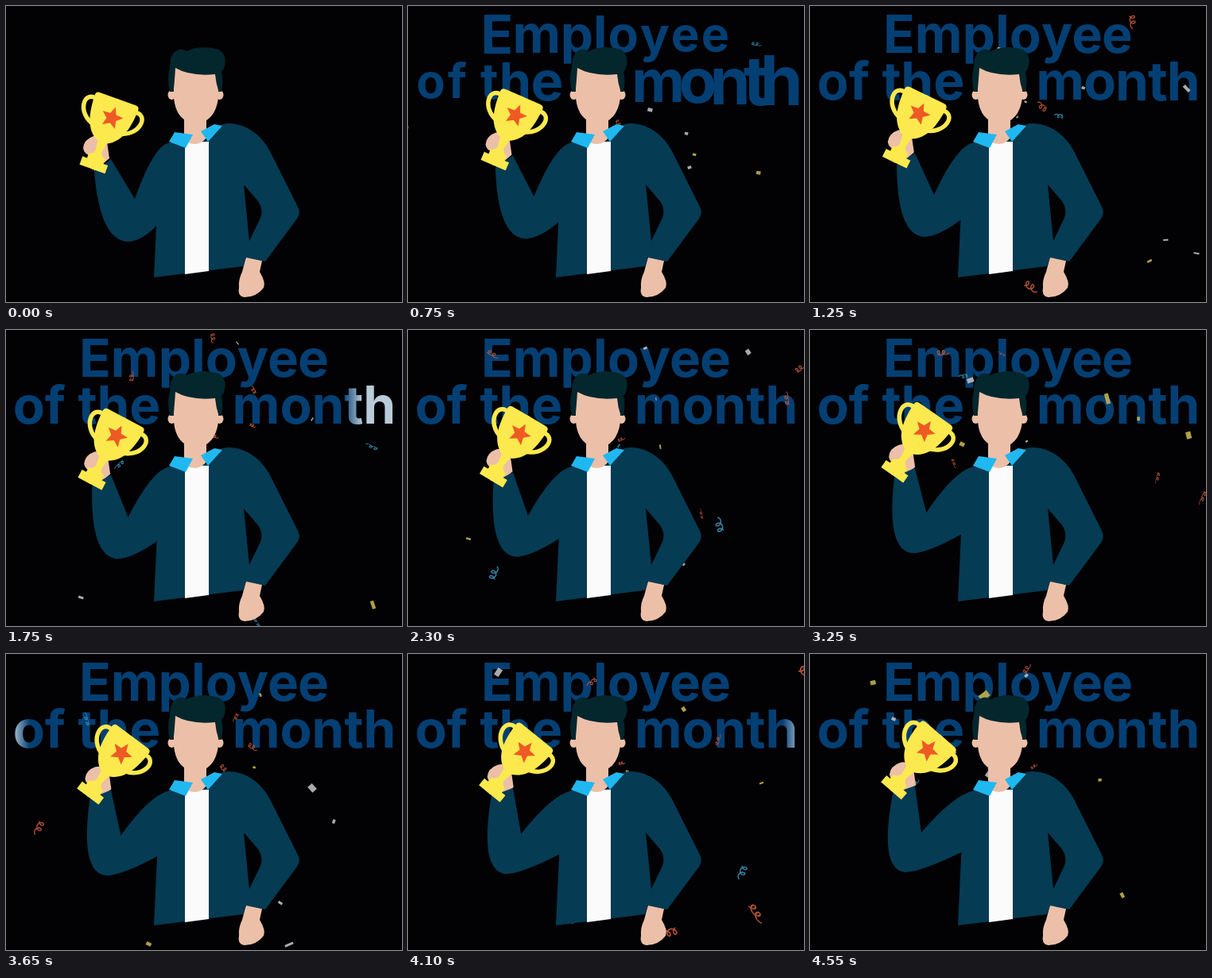
An HTML page with a canvas for the animation above (4600 ms loop, 498 by 373 pixels).

```html
<!DOCTYPE html>
<html lang="en">
<head>
<meta charset="utf-8">
<title>Employee of the month</title>
<style>
html, body { margin: 0; width: 100%; height: 100%; overflow: hidden; background: #020104; }
canvas { display: block; width: 498px; height: 373px; }
</style>
</head>
<body>
<canvas id="stage" width="498" height="373"></canvas>
<script>
const W = 498, H = 373, LOOP = 4600, STEP = 50;
const ctx = document.getElementById('stage').getContext('2d');
const NIGHT = '#020104', NAVY = '#053b53', SKIN = '#ecc0a8', HAIR = '#04262d',
      SKY = '#20b8f0', YELLOW = '#fbe94e', STAR = '#ee5a24', TEXT = '#043f73', GLOSS = '#b9cad8';

const lerp = (a, b, p) => a + (b - a) * p;
const fill = (d, color) => { ctx.fillStyle = color; ctx.fill(new Path2D(d)); };

// Lettering: each letter springs in, then a shine sweeps across
const LINES = [['Employee', 249, 59], ['of the', 101.5, 118], ['month', 387.5, 118]];
const POP = { start: 46, stagger: 28, swing: 260, decay: 216 };
const SHINE = { start: 1340, every: 1155, speed: 1.18 };

const spring = t => 1 - Math.exp(-t / POP.decay) * Math.cos(Math.PI * t / POP.swing);

function textColor(t) {
  if (t < SHINE.start) return TEXT;
  const x = -15 + ((t - SHINE.start) % SHINE.every) * SHINE.speed;
  const g = ctx.createLinearGradient(x - 45, 0, x + 45, 0);
  g.addColorStop(0, TEXT);
  g.addColorStop(0.27, GLOSS);
  g.addColorStop(0.75, GLOSS);
  g.addColorStop(1, TEXT);
  return g;
}

function drawText(t) {
  ctx.font = '700 65.5px Inter, "Open Sans", sans-serif';
  ctx.fillStyle = textColor(t);
  const width = s => ctx.measureText(s).width;
  let n = 0;
  for (const [line, center, base] of LINES) {
    const left = center - width(line) / 2;
    [...line].forEach((ch, i) => {
      if (ch === ' ') return;
      const local = t - POP.start - POP.stagger * n++;
      if (local <= 0) return;
      const x = left + width(line.slice(0, i));
      const cx = x + width(ch) / 2, cy = base - 22, s = spring(local);
      ctx.save();
      ctx.translate(cx, cy);
      ctx.scale(s, s);
      ctx.translate(-cx, -cy);
      ctx.fillText(ch, x, base);
      ctx.restore();
    });
  }
}

// Confetti: a steady burst from behind the head that grows as it nears the viewer
const PAPER = ['#c2b04c', '#bdbdbd'], CURL = ['#c25a3a', '#3c94b8'];
const COUNT = 125, ORIGIN = { x: 268, y: 138 };
let seed = 29;
const rnd = () => (seed = (seed * 16807) % 2147483647) / 2147483647;

const pieces = Array.from({ length: COUNT }, (_, i) => {
  const curl = rnd() < 0.4, near = rnd() ** 4;
  return {
    curl,
    born: 30 + i * 4500 / COUNT,
    color: (curl ? CURL : PAPER)[rnd() < 0.6 ? 0 : 1],
    dir: rnd() * Math.PI * 2,
    speed: 0.22 + 0.25 * rnd() + 0.15 * near,
    size: (curl ? 13 + 7 * rnd() : 6) + 12 * near,
    angle: rnd() * Math.PI * 2,
    spin: (rnd() - 0.5) * 0.01
  };
});

function drawCurl(s) {
  ctx.lineWidth = Math.max(1, s * 0.08);
  ctx.beginPath();
  for (let a = 0; a <= 14; a += 0.4) {
    const along = (a / 14 - 0.5) * s;
    ctx.lineTo(along * 0.8 + Math.sin(a) * s * 0.17, along * 0.3 + Math.cos(a) * s * 0.2);
  }
  ctx.stroke();
}

function drawConfetti(t) {
  for (const p of pieces) {
    const age = t - p.born;
    if (age <= 0 || age > 1700) continue;
    const r = p.speed * age * (0.7 + age / 2500);
    const s = p.size * (0.5 + r / 400);
    ctx.save();
    ctx.globalAlpha = 0.9;
    ctx.translate(ORIGIN.x + Math.cos(p.dir) * r * 1.15, ORIGIN.y + Math.sin(p.dir) * r + age * age * 2e-5);
    ctx.rotate(p.angle + age * p.spin * 0.4);
    ctx.scale(1, 0.3 + 0.7 * Math.abs(Math.cos(p.angle + age * p.spin)));
    ctx.fillStyle = ctx.strokeStyle = p.color;
    if (p.curl) drawCurl(s);
    else ctx.fillRect(-s / 2, -s * 0.4, s, s * 0.8);
    ctx.restore();
  }
}

// Raised arm: a few joints slide steadily while the sleeve follows
function drawArm(p) {
  const joint = (x, y, dx, dy) => `${x + dx * p} ${y + dy * p} `;
  const elbow = (ox, oy) => joint(152 + ox, 297 + oy, -32, -22);
  fill('M206 172 Q' + joint(186, 175, -6, 3) + joint(162, 243, -22, -18) +
    'L' + joint(132, 193, 0, -27) + 'L' + joint(111, 209, -7, -33) +
    'Q' + elbow(-34, -3) + elbow(0, 0) + 'Q' + elbow(18, 0) + joint(189, 277, 1, -27) +
    'H215 V172Z', NAVY);
}

function drawHand(p) {
  ctx.save();
  ctx.translate(3 * p - 1, -27 * p);
  fill('M98 179 Q99 168 111 164 Q121 161 128 171 L131 192 L112 208 L109 189 Q99 187 98 179Z', SKIN);
  ctx.restore();
}

function drawStar(r) {
  ctx.beginPath();
  for (let i = 0; i < 10; i++) {
    const a = i * Math.PI / 5 - Math.PI / 2, q = i % 2 ? r * 0.45 : r;
    ctx.lineTo(Math.cos(a) * q, Math.sin(a) * q);
  }
  ctx.fillStyle = STAR;
  ctx.fill();
}

function drawTrophy(p) {
  ctx.save();
  ctx.translate(lerp(133, 148, p), lerp(141, 121, p));
  ctx.rotate(lerp(20, 41, p) * Math.PI / 180);
  ctx.strokeStyle = YELLOW;
  ctx.lineWidth = 5.5;
  for (const side of [-1, 1]) {
    ctx.save();
    ctx.translate(-1, 0);
    ctx.scale(side, 1);
    ctx.stroke(new Path2D('M24 -16 C45 -22 43 10 16 16'));
    fill('M-1 -25 H24 Q29 -25 29 -20 C28 4 24 24 6 33 L4 45 Q5 50 11 52 V58 H17 V69 H-1Z', YELLOW);
    ctx.restore();
  }
  drawStar(14.5);
  ctx.restore();
}

function drawBody() {
  fill('M302 316 L322 321 L319 335 Q327 348 324 355 Q315 367 300 367 Q291 366 293 355 Q292 345 297 335Z', SKIN);
  fill('M206 172 L226 176 L255 168 L272 149 Q284 146 297 151 Q321 160 334 187 L367 253 Q371 261 366 268 L326 322 L302 317 L298 328 L186 342 L189 277 L191 235Z', NAVY);
  fill('M299 225 L317 246 Q324 256 320 267 L306 296Z', NIGHT);
  fill('M225 171 H255 V334 L225 338Z', '#fcfbfc');
  fill('M224 138 H252 V166 Q247 173 238 174 Q228 174 224 166Z', SKIN);
  fill('M205 171 L212 159 L235 162 L226 179Z', SKY);
  fill('M245 158 L262 149 L272 151 L254 171Z', SKY);
}

function drawHead() {
  ctx.fillStyle = SKIN;
  for (const x of [208.5, 268.5]) {
    ctx.beginPath();
    ctx.ellipse(x, 112, 5, 6, 0, 0, Math.PI * 2);
    ctx.fill();
  }
  fill('M206 108 Q202 92 206 77 Q206 62 213 57 Q220 52 227 57 Q246 48 268 55 Q278 62 275 75 Q274 80 271 83 Q274 95 271 108Z', HAIR);
  fill('M213 78 Q232 89 263 86 Q264 97 267 106 V116 Q263 146 239 148 Q214 146 211 116 V104 Q212 94 213 78Z', SKIN);
}

function draw(t) {
  const p = t / (LOOP - STEP);
  ctx.fillStyle = NIGHT;
  ctx.fillRect(0, 0, W, H);
  drawText(t);
  drawConfetti(t);
  drawHand(p);
  drawArm(p);
  drawBody();
  drawHead();
  drawTrophy(p);
}

const start = performance.now();
function tick() {
  const t = (performance.now() - start) % LOOP;
  draw(Math.floor(t / STEP) * STEP);
  requestAnimationFrame(tick);
}
tick();
</script>
</body>
</html>
```
